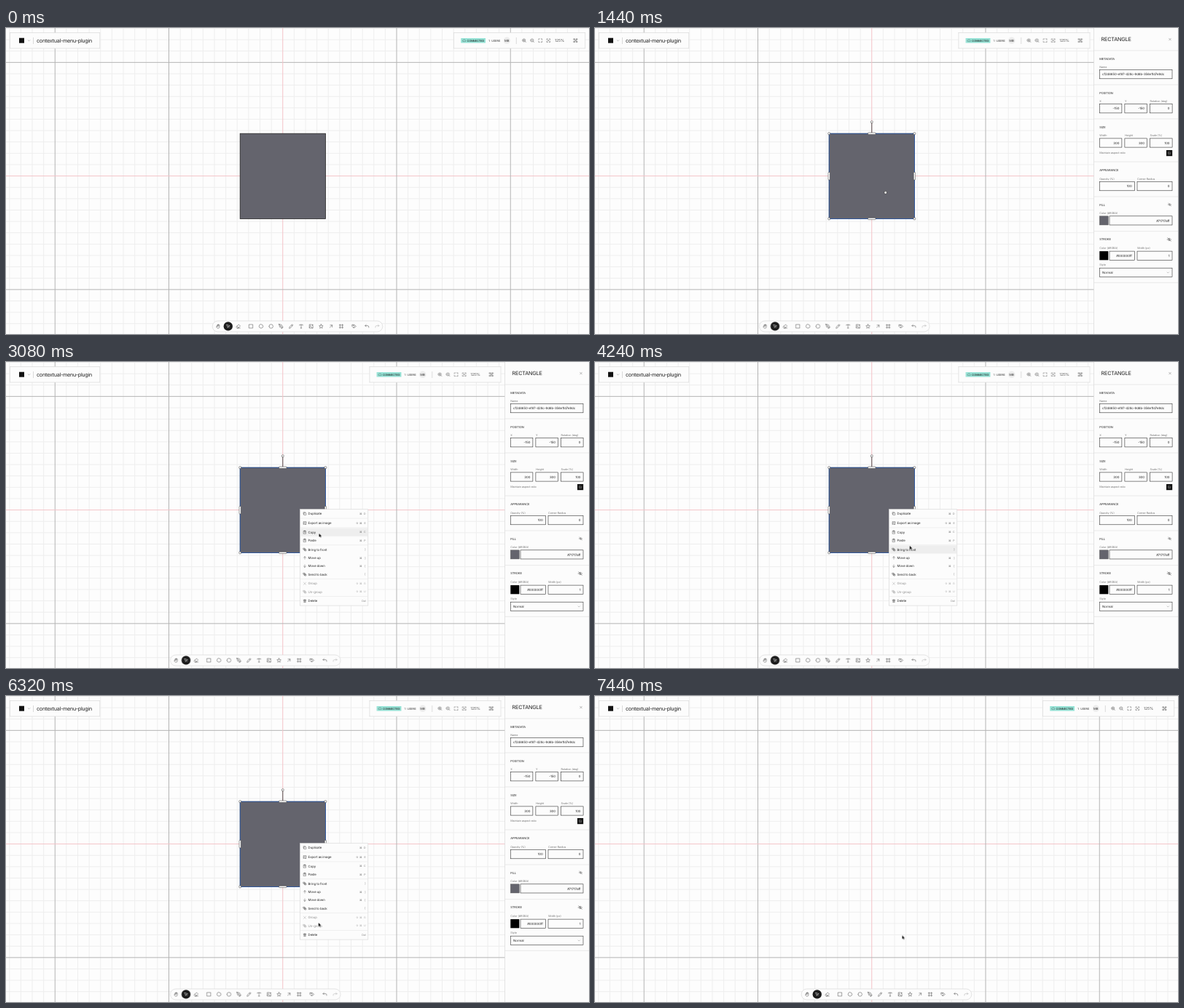
An HTML page that plays this animation: 800 by 421 pixels, repeating every 7.88 s.

```html
<!DOCTYPE html>
<html lang="en">
<head>
<meta charset="utf-8">
<title>Contextual menu</title>
<style>
html, body { margin: 0; width: 100%; height: 100%; overflow: hidden; background: #fdfdfd; }
svg { display: block; width: 800px; height: 421px; font-family: Inter, "DejaVu Sans", sans-serif; }
text { letter-spacing: -.02em; text-rendering: geometricPrecision; }
.icon { fill: none; stroke: #444; stroke-width: 1.8; stroke-linecap: round; stroke-linejoin: round; }
.box { fill: #fcfcfc; stroke: #d9d9d9; stroke-width: .7; }
.field { fill: #fcfcfc; stroke: #222; stroke-width: .55; }

.timed { animation: 7880ms infinite both; }
#panel { animation-name: panel; }
#status { animation-name: status; }
#tools { animation-name: tools; }
#shape { animation-name: shape; }
#selection { animation-name: selection; }
#menu { animation-name: menu; }
#hover { animation-name: hover; }
#cursor { animation-name: cursor; animation-timing-function: linear; }
#arrow { animation-name: arrow; }
#hand { animation-name: hand; }
#shape, #selection, #menu, #hover, #arrow, #hand { animation-timing-function: step-end; }

@keyframes panel {
  0%, 13.71% { transform: translateX(116px); animation-timing-function: ease-out; }
  16.24%, 91.88% { transform: none; }
  94.4%, 100% { transform: translateX(116px); }
}
@keyframes status {
  0%, 13.71% { transform: none; animation-timing-function: ease-out; }
  16.24%, 91.88% { transform: translateX(-115.6px); }
  94.4%, 100% { transform: none; }
}
@keyframes tools {
  0%, 13.71% { transform: none; animation-timing-function: ease-out; }
  16.24%, 91.88% { transform: translateX(-57.8px); }
  94.4%, 100% { transform: none; }
}
@keyframes shape { 0% { opacity: 1; } 91.88%, 100% { opacity: 0; } }
@keyframes selection { 0% { opacity: 0; } 13.2% { opacity: 1; } 91.88%, 100% { opacity: 0; } }
@keyframes menu { 0% { opacity: 0; } 27.92% { opacity: 1; } 91.88%, 100% { opacity: 0; } }
@keyframes hover {
  0% { transform: translateY(-30px); }
  32.49% { transform: translateY(208.6px); }
  34.92% { transform: translateY(221.5px); }
  37.56% { transform: translateY(234.2px); }
  44.68% { transform: translateY(245.5px); }
  52.83% { transform: translateY(258px); }
  59.01% { transform: translateY(269.4px); }
  63.27% { transform: translateY(280.8px); }
  66.31% { transform: translateY(292.2px); }
  69.53% { transform: translateY(-30px); }
  86.54%, 100% { transform: translateY(328.8px); }
}
@keyframes cursor {
  0%, .5% { transform: translate(441px, 424px); animation-timing-function: ease-out; }
  12.69%, 20.81% { transform: translate(398px, 224px); }
  27.41%, 31.98% { transform: translate(403px, 201px); }
  39.09%, 42.13% { transform: translate(429.5px, 236px); }
  46.95% { transform: translate(430.5px, 243px); }
  53.3%, 53.81% { transform: translate(431.7px, 252.8px); }
  61.93% { transform: translate(434px, 270px); }
  71.07%, 72.59% { transform: translate(435px, 304px); }
  80.2% { transform: translate(428.7px, 312px); }
  82.74% { transform: translate(428px, 313px); }
  89.34%, 100% { transform: translate(421.5px, 329.5px); }
}
@keyframes arrow { 0% { opacity: 1; } 6% { opacity: 0; } 27.92%, 100% { opacity: 1; } }
@keyframes hand { 0% { opacity: 0; } 6% { opacity: 1; } 27.92%, 100% { opacity: 0; } }
</style>
</head>
<body>
<svg id="stage" viewBox="0 0 800 421" xmlns="http://www.w3.org/2000/svg"></svg>
<script>
// All y values for text and icons are vertical centres.
const text = (x, y, s, size = 4.375, extra = 'fill="#222"') =>
  `<text x="${x}" y="${y + size * .36}" font-size="${size}" ${extra}>${s}</text>`;
const rect = (x, y, w, h, extra) =>
  `<rect x="${x}" y="${y}" width="${w}" height="${h}" ${extra}/>`;
const line = (x1, y1, x2, y2, color, w = 1) =>
  `<path d="M${x1} ${y1}L${x2} ${y2}" stroke="${color}" stroke-width="${w}"/>`;
const icon = (x, y, d, size = 6.6, extra = '') =>
  `<path class="icon" ${extra} transform="translate(${x} ${y}) scale(${size / 24}) translate(-12 -12)" d="${d}"/>`;
const group = (id, body) => `<g id="${id}" class="timed">${body}</g>`;

const ICONS = {
  hand: 'M7 13V7a2 2 0 0 1 4 0V4a2 2 0 0 1 4 0v3a2 2 0 0 1 4 0v8a7 7 0 0 1-7 7c-4 0-5-2-8-6a2 2 0 0 1 3-3zM11 7v5M15 7v5',
  pointer: 'M4 4l6 16 3-7 7-3zM13 13l6 6',
  eraser: 'M7 21l-4-4a2 2 0 0 1 0-3L13 4a2 2 0 0 1 3 0l5 5a2 2 0 0 1 0 3l-9 9zM22 21H7M6 11l9 9',
  square: 'M3 3h18v18H3z',
  hexagon: 'M12 2l8 4 2 6-2 6-8 4-8-4-2-6 2-6z',
  circle: 'M2 12a10 10 0 1 0 20 0a10 10 0 1 0-20 0',
  pen: 'M2 2l4 14 8 3 6-6-4-7zM2 2l9 9M11 11a1.5 1.5 0 1 0 2 2M15 21l6-6 2 2-6 6z',
  pencil: 'M3 21l1-6L17 3q3-1 4 3L9 20zM14 6l4 4',
  type: 'M4 7V4h16v3M12 4v17M9 21h6',
  image: 'M21 12v9H3V3h10M3 17l6-5 10 9M16 6h6M19 3v6M7 8h2',
  star: 'M12 2l3 7 7 .6-5.5 5 1.7 7.4-6.2-4-6.2 4 1.7-7.4-5.5-5 7-.6z',
  arrowUpRight: 'M6 18L18 6M8 6h10v10',
  frame: 'M2 6h20M2 18h20M6 2v20M18 2v20',
  tag: 'M8 5h7l7 7-7 7H9M2 5v7l7 7 6-7-7-7zM6 9h1',
  undo: 'M8 4L3 9l5 5M3 9h12a6 6 0 0 1 6 6v3',
  redo: 'M16 4l5 5-5 5M21 9H9a6 6 0 0 0-6 6v3',
  zoomOut: 'M3 11a8 8 0 1 0 16 0a8 8 0 1 0-16 0M21 21l-4-4M8 11h6',
  corners: 'M3 8V3h5M16 3h5v5M21 16v5h-5M8 21H3v-5',
  network: 'M3 3h5v5H3zM16 3h5v5h-5zM3 16h5v5H3zM16 16h5v5h-5zM8 8l8 8M16 8l-8 8',
  cloud: 'M7 19a5 5 0 0 1-1-10 7 7 0 0 1 13 2 4 4 0 0 1-1 8z',
  chevron: 'M5 9l7 7 7-7',
  cross: 'M5 5l14 14M19 5L5 19',
  eyeOff: 'M2 12q10-14 20 0-10 14-20 0M9 12a3 3 0 1 0 6 0a3 3 0 1 0-6 0M3 3l18 18',
  copy: 'M8 8h13v13H8zM4 16H3V3h13v1',
  clipboard: 'M5 4h14v18H5zM9 2h6v4H9zM9 13h6',
  layers: 'M3 3h8v8H3zM13 13h8v8h-8zM11 7h6v6M7 11v6h6',
  up: 'M12 20V4M5 11l7-7 7 7',
  down: 'M12 4v16M5 13l7 7 7-7',
  trash: 'M3 6h18M6 6v15h12V6M9 6V3h6v3M10 11v6M14 11v6'
};
ICONS.zoomIn = ICONS.zoomOut + 'M11 8v6';
ICONS.fit = ICONS.corners + 'M8 8l8 8M16 8l-8 8';

function grid() {
  const cx = 379.75, cy = 203.6, step = 15.625;
  let minor = '', major = '';
  for (let i = -25; i <= 27; i++) {
    const strong = i % 10 === 0, x = cx + i * step, y = cy + i * step;
    const color = i === 0 ? '#f4c3c8' : strong ? '#b4b4b4' : '#eeeeee';
    const lines = line(x, 0, x, 421, color) + line(0, y, 800, y, color);
    if (strong) major += lines; else minor += lines;
  }
  return minor + major;
}

function selection() {
  const [l, t, r, b] = [321.2, 145.2, 438.4, 262.4], mx = 379.8, my = 203.7;
  const knob = (x, y, w = 2.8, h = 2.8) =>
    rect(x - w / 2, y - h / 2, w, h, 'rx=".7" fill="#fff" stroke="#333" stroke-width=".5"');
  let s = rect(l, t, r - l, b - t, 'fill="none" stroke="#2b62c4" stroke-width=".7"');
  s += line(mx, 130, mx, t, '#444', .9) + knob(mx, 129.3);
  for (const x of [l, r]) s += knob(x, t) + knob(x, b) + knob(x, my, 2.4, 10.4);
  for (const y of [t, b]) s += knob(mx, y, 10.4, 2.4);
  return s;
}

function title() {
  return rect(5.4, 6.4, 123.4, 21.6, 'class="box"') +
    rect(18, 13.7, 7, 7, 'fill="#111"') + icon(31.5, 17.2, ICONS.chevron, 4.5) +
    line(37.5, 13, 37.5, 22, '#ccc', .7) +
    text(42, 17.2, 'contextual-menu-plugin', 7.2, 'fill="#222" style="letter-spacing:-.25px"');
}

function status() {
  let s = rect(614.4, 6.4, 180.4, 21.6, 'class="box"') +
    rect(624.3, 14, 33.7, 6.5, 'fill="#94e2d5"') + icon(628.7, 17.2, ICONS.cloud, 5) +
    text(632.4, 17.2, 'CONNECTED', 3.75, 'fill="#222" font-weight="500" style="letter-spacing:0"') +
    text(662.2, 17.2, '1', 3.75) + text(666.2, 17.2, 'USERS', 3.75) +
    '<circle cx="687.3" cy="17.2" r="4.6" fill="#ececec"/>' +
    text(687.3, 17.2, 'MB', 4.2, 'fill="#333" text-anchor="middle"') +
    line(700.3, 13, 700.3, 22, '#ccc', .7) +
    text(753, 17.2, '125%', 5.2, 'fill="#555"') + icon(781.6, 17.2, ICONS.network, 6.4);
  ['zoomIn', 'zoomOut', 'corners', 'fit'].forEach((n, i) => s += icon(711 + i * 11.1, 17.2, ICONS[n], 6.2));
  return s;
}

function tools() {
  const items = [['hand', 291], ['eraser', 318.6], ['square', 336.2], ['hexagon', 350], ['circle', 363.7],
    ['pen', 377.3], ['pencil', 391.2], ['type', 405], ['image', 418.7], ['star', 432.4],
    ['arrowUpRight', 446], ['frame', 460], ['tag', 477.6], ['undo', 495.3], ['redo', 509.4]];
  let s = rect(283.2, 403, 233.6, 15, 'rx="7.5" class="box"') +
    '<circle cx="304.8" cy="410.4" r="6.2" fill="#1c1c1c"/>' +
    icon(304.8, 410.4, ICONS.pointer, 6, 'style="stroke:#fff"');
  for (const [name, x] of items)
    s += icon(x, 410.4, ICONS[name], 6.6, name === 'redo' ? 'style="stroke:#aaa"' : '');
  return s;
}

function panel() {
  const label = (x, y, s) => text(x, y, s, 3.75, 'fill="#777"');
  const field = (x, y, w, s, anchor = 'end') => rect(x, y, w, 12.2, 'class="field"') +
    text(anchor === 'end' ? x + w - 3.6 : x + 3.8, y + 6.2, s, 4.375, `fill="#222" text-anchor="${anchor}"`);
  const row = (y, cols, w, gap) => cols.map(([name, value], i) => {
    const x = 692.3 + i * gap;
    return label(x, y, name) + field(x, y + 4.4, w, value);
  }).join('');

  let s = rect(684.6, -1, 117, 423, 'class="box"') +
    text(694.5, 15.8, 'RECTANGLE', 7.3, 'fill="#222" style="letter-spacing:-.2px"') +
    icon(789, 15.6, ICONS.cross, 4.6);
  for (const y of [31, 78, 125, 184, 232, 279.7, 350.3]) s += line(684.6, y, 800, y, '#e2e2e2', .8);
  const heads = { METADATA: 42.3, POSITION: 89.4, SIZE: 136.4, APPEARANCE: 196, FILL: 243.3, STROKE: 291 };
  for (const name in heads) s += text(692.2, heads[name], name, 4.06);

  s += label(692.3, 53.3, 'Name') + field(692.3, 57.6, 99.7, 'cf246650-e197-428c-9d6b-356e11d7e9dc', 'start');
  s += row(100.3, [['X', '-150'], ['Y', '-150'], ['Rotation (deg)', '0']], 30.6, 34.6);
  s += row(147.5, [['Width', '300'], ['Height', '300'], ['Scale (%)', '100']], 30.6, 34.6);
  s += label(692.3, 172.1, 'Maintain aspect ratio') + rect(784, 168, 8.2, 8.2, 'fill="#111"') +
    icon(788.1, 172.1, 'M14 4H4v16h16v-8M8 11l4 4 9-10', 4.6, 'style="stroke:#ddd"');
  s += row(207.2, [['Opacity (%)', '100'], ['Corner Radius', '0']], 48, 51.7);

  s += icon(788.6, 243, ICONS.eyeOff, 5) + label(692.3, 254.3, 'Color (#RGBA)') +
    rect(692.3, 258.8, 12, 12.2, 'fill="#64646d" stroke="#555" stroke-width=".4"') +
    field(706, 258.8, 86, '#71717aff');
  s += icon(788, 291, ICONS.eyeOff, 6.2) + label(692.3, 302.6, 'Color (#RGBA)') + label(744, 302.6, 'Width (px)') +
    rect(692.3, 307.1, 12, 12.2, 'fill="#000"') + field(706, 307.1, 34.3, '#000000ff') + field(744, 307.1, 48, '1');
  return s + label(692.3, 325.8, 'Style') + field(692.3, 330.2, 99.7, 'Normal', 'start') +
    icon(786.3, 336.4, ICONS.chevron, 4.2);
}

function menu() {
  const items = [
    ['Duplicate', 208.6, 'copy', '⌘ D'], ['Export as image', 221.5, 'image', '⇧ ⌘ E'],
    ['Copy', 234.2, 'clipboard', '⌘ C'], ['Paste', 245.5, 'clipboard', '⌘ P'],
    ['Bring to front', 258, 'layers', ']'], ['Move up', 269.4, 'up', '⌘ ]'],
    ['Move down', 280.8, 'down', '⌘ ['], ['Send to back', 292.2, 'layers', '['],
    ['Group', 304.8, 'cross', '⇧ ⌘ G', true], ['Un-group', 316.2, 'layers', '⇧ ⌘ U', true],
    ['Delete', 328.8, 'trash', 'Del']
  ];
  let s = rect(403.6, 202.7, 93.2, 132.4, 'class="box"') +
    '<rect id="hover" class="timed" x="404.6" y="-5.6" width="91.4" height="11.2" fill="#eeeeee"/>';
  for (const y of [215.1, 227.9, 251.7, 298.5, 322.5]) s += line(404, y, 496.5, y, '#e8e8e8', .6);
  for (const [name, y, glyph, keys, disabled] of items) {
    const color = disabled ? '#8c8c8c' : '#222';
    s += icon(410, y, ICONS[glyph], 5, `style="stroke:${color}"`) +
      text(414.6, y, name, 4.375, `fill="${color}"`);
    const parts = keys.split(' ');
    parts.forEach((k, i) => s += text(493.5 - (parts.length - 1 - i) * 5, y, k, 3.5,
      `fill="${disabled ? '#aaa' : '#777'}" text-anchor="end"`));
  }
  return s;
}

const cursor =
  '<path id="arrow" class="timed" d="M0 0V4.8L1.2 3.8 2 5.6 2.9 5.2 2.1 3.4H3.6Z" fill="#111" stroke="#fff" stroke-width=".5" paint-order="stroke"/>' +
  '<g id="hand" class="timed"><path d="M-.9 1.5Q-1.3 .6 -.3 .6 .6-.1 1.2 .5 2.5 .4 2.5 1.7V3Q2.3 4.3 .8 4.3-.7 4.3-1.3 2.8Z" fill="#fff" stroke="#222" stroke-width=".6"/>' +
  '<path d="M0 1.2V2.2M1.1 1.2V2.2" stroke="#222" stroke-width=".4"/></g>';

document.getElementById('stage').innerHTML = grid() +
  group('shape', rect(321.2, 145.2, 117.2, 117.2, 'fill="#64646d" stroke="#222" stroke-width=".8"')) +
  group('selection', selection()) + title() + group('status', status()) + group('tools', tools()) +
  group('panel', panel()) + group('menu', menu()) + group('cursor', cursor);
</script>
</body>
</html>
```
